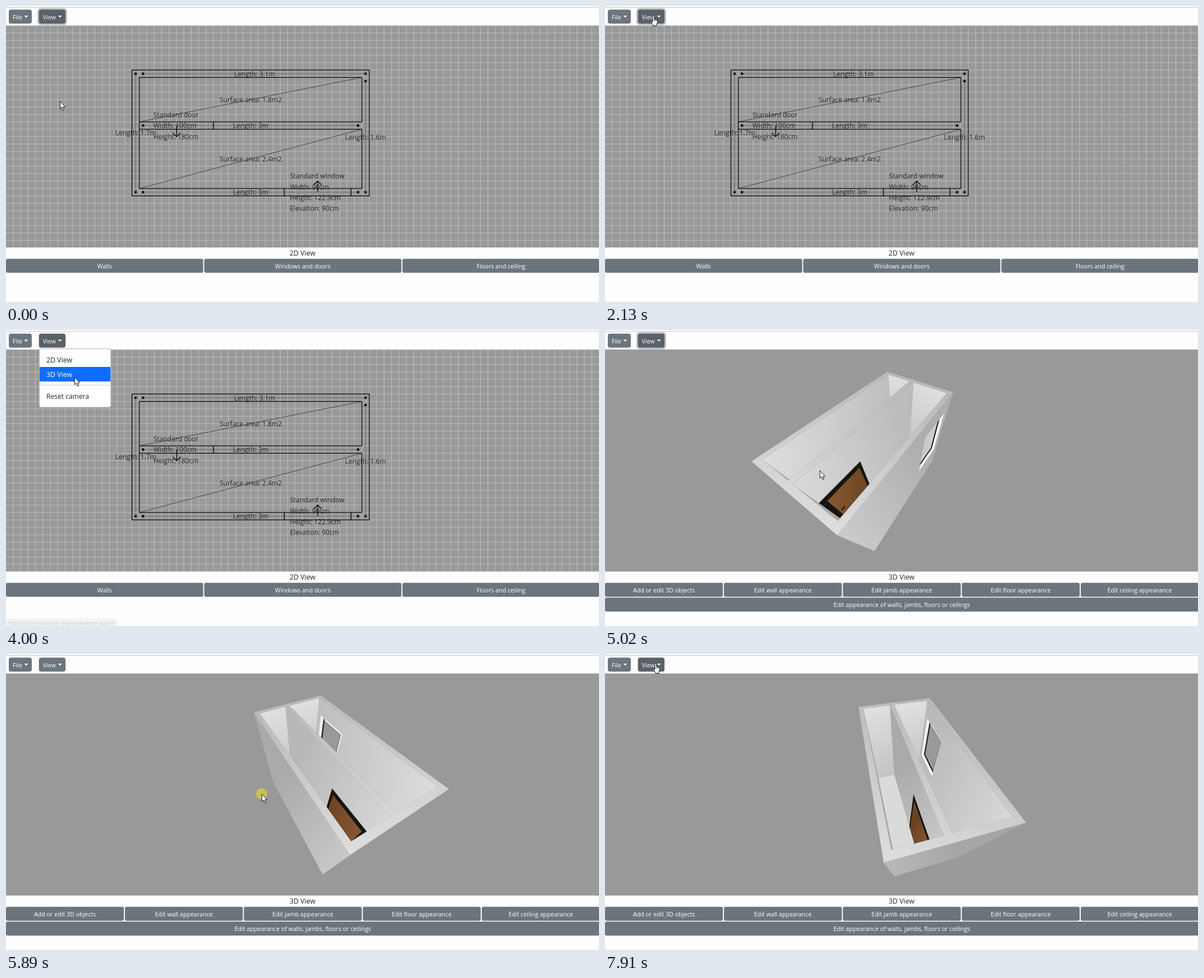
Write an HTML page with a canvas that moves like this. It is 1058 by 529 pixels and loops after 8000 ms.

```html
<!DOCTYPE html>
<html lang="en">
<head>
<meta charset="utf-8">
<title>Floor plan editor</title>
<style>
  html, body { margin: 0; width: 100%; height: 100%; overflow: hidden; background: #fefefe; }
  canvas { display: block; }
</style>
</head>
<body>
<canvas id="stage" width="1058" height="529"></canvas>
<script>
const ctx = document.getElementById("stage").getContext("2d");
const LOOP = 8000, TICK = 125.8;
const CX = 529, CY = 233.5, TOP = 34.8, BOTTOM = 431.7;
const GREY = "#6c757d", DARK = "#5a6168";

// Where the pointer glides to: x, y
const PATH = [
  { from: 0, lasts: 1, at: [96, 170] },
  { from: 490, lasts: 490, at: [86, 17] },
  { from: 2640, lasts: 360, at: [110, 83] },
  { from: 3520, lasts: 360, at: [122, 84] },
  { from: 4520, lasts: 490, at: [383, 251] },
  { from: 5290, lasts: 600, at: [456, 250] },
  { from: 6030, lasts: 610, at: [438, 250] },
  { from: 6910, lasts: 360, at: [134, 5] },
  { from: 7290, lasts: 600, at: [90, 16] }
];

// Where the camera swings to: yaw, pitch in degrees
const SWING = [
  { from: 0, lasts: 1, at: [32.9, 54.9] },
  { from: 5290, lasts: 600, at: [-28.6, 54.3] },
  { from: 6030, lasts: 740, at: [-14.2, 54.9] }
];

// The screen refreshes in even ticks
const snap = t => Math.max(0, 610 + TICK * Math.floor((t - 595) / TICK));
const within = (t, a, b) => t >= a && t < b;
const grey = v => { v = Math.round(v); return `rgb(${v},${v},${v})`; };

function glide(keys, t) {
  const i = keys.findLastIndex(k => k.from <= t);
  const key = keys[i], before = keys[Math.max(0, i - 1)].at;
  const u = Math.min(1, (t - key.from) / key.lasts);
  const eased = u * u * (3 - 2 * u);
  return key.at.map((v, j) => before[j] + (v - before[j]) * eased);
}

function rect(x, y, w, h, color) {
  ctx.fillStyle = color;
  ctx.fillRect(x, y, w, h);
}

function box(x, y, w, h, r, color) {
  ctx.beginPath();
  ctx.roundRect(x, y, w, h, r);
  ctx.fillStyle = color;
  ctx.fill();
}

function text(s, x, y, size, color, align = "left") {
  ctx.font = `${size}px "Open Sans", "Noto Sans", sans-serif`;
  ctx.textAlign = align;
  ctx.fillStyle = color;
  ctx.fillText(s, x, y);
}

function trace(points, close = true) {
  ctx.beginPath();
  points.forEach(([x, y]) => ctx.lineTo(x, y));
  if (close) ctx.closePath();
}

function fillPoly(points, color) {
  trace(points);
  ctx.fillStyle = color;
  ctx.fill();
}

function line(points, color, width = 1) {
  trace(points, false);
  ctx.strokeStyle = color;
  ctx.lineWidth = width;
  ctx.stroke();
}

/* ---------- page ---------- */

function dropButton(label, x, w, color) {
  box(x, 6.5, w, 25, 4, color);
  text(label, x + 7, 23.5, 10.7, "#fff");
  const c = x + w - 10;
  fillPoly([[c - 3.5, 17.3], [c + 3.5, 17.3], [c, 20.8]], "#fff");
}

function row(labels, y) {
  const pitch = 1061 / labels.length, w = pitch - 1.9;
  labels.forEach((s, i) => {
    box(i * pitch, y, w, 25, 3, GREY);
    text(s, i * pitch + w / 2, y + 17, 10.7, "#fff", "center");
  });
}

function page(t, is3d) {
  rect(0, 0, 1058, TOP, "#fefefe");
  rect(0, BOTTOM, 1058, 529 - BOTTOM, "#fefefe");
  rect(0, 2, 1058, 1, "#c4c4c4");
  if (t < 3890 || within(t, 4130, 5410)) box(56, 3.5, 53, 31, 6, "#c0c4c8");
  dropButton("File", 5, 41, GREY);
  dropButton("View", 58.7, 47.5, t < 5410 || t >= 7660 ? DARK : GREY);

  text(is3d ? "3D View" : "2D View", CX, 446, 12.4, "#212529", "center");
  if (is3d) {
    row(["Add or edit 3D objects", "Edit wall appearance", "Edit jamb appearance",
      "Edit floor appearance", "Edit ceiling appearance"], 451.7);
    row(["Edit appearance of walls, jambs, floors or ceilings"], 478.2);
  } else {
    row(["Walls", "Windows and doors", "Floors and ceiling"], 451.7);
  }
}

function menu(t) {
  if (!within(t, 2250, 4130)) return;
  box(59, 33, 128.5, 105.5, 4, "#b9b9b9");
  box(60, 34, 126.5, 103.5, 3, "#fff");
  const pressed = t >= 3890;
  if (within(t, 2770, 2890)) rect(60, 40, 126.5, 26, "#e9ecef");
  if (t >= 2890) rect(60, 66, 126.5, 26, pressed ? "#0d6efd" : "#e9ecef");
  rect(60, 98, 126.5, 1, "#cfcfcf");
  text("2D View", 72, 58, 12.4, "#212529");
  text("3D View", 72, 83.8, 12.4, pressed ? "#fff" : "#212529");
  text("Reset camera", 72, 123.2, 12.1, "#212529");
}

function status(t) {
  const full = within(t, 2770, 4130);
  if (full) box(-4, 515.5, 203, 18, 3, "#f3f3f3");
  if (full || within(t, 2370, 2520)) {
    text("https://home-planner-deployed.vercel.app/#", 3, 527, 9.14, full ? "#c6c6c6" : "#e2e2e2");
  }
}

/* ---------- plan ---------- */

const CELL = 397 / 30;
const gx = i => CX + i * CELL;
const gy = i => CY + i * CELL;

function arrow(x, y, dir) {
  const tip = y + dir * 20;
  line([[x, y], [x, tip]], "#000", 1.3);
  line([[x - 7, tip - dir * 7], [x, tip], [x + 7, tip - dir * 7]], "#000", 1.3);
}

function axis(x1, y1, x2, y2) {
  const ends = [[gx(x1), gy(y1)], [gx(x2), gy(y2)]];
  line(ends, "#666");
  for (const [x, y] of ends) {
    ctx.beginPath();
    ctx.arc(x, y, 2.3, 0, 7);
    ctx.fillStyle = "#000";
    ctx.fill();
  }
}

function plan() {
  for (let i = -40; i <= 40; i++) line([[gx(i), TOP], [gx(i), BOTTOM]], "#bdbdbd");
  for (let i = -15; i <= 15; i++) line([[0, gy(i)], [1058, gy(i)]], "#bdbdbd");

  axis(-21.5, -8.5, 8.5, -8.5);
  axis(-22.5, -8.5, -22.5, 7.5);
  axis(8.5, -7.5, 8.5, 7.5);
  axis(-21.5, -1.5, 7.5, -1.5);
  axis(-21.5, 7.5, 7.5, 7.5);
  line([[gx(-22), gy(-2)], [gx(8), gy(-8)]], "#444");
  line([[gx(-22), gy(7)], [gx(8), gy(-1)]], "#444");

  ctx.strokeStyle = "#0a0a0a";
  ctx.lineWidth = 1.3;
  ctx.strokeRect(gx(-23), gy(-9), 32 * CELL, 17 * CELL);
  ctx.strokeRect(gx(-22), gy(-8), 30 * CELL, 6 * CELL);
  ctx.strokeRect(gx(-22), gy(-1), 30 * CELL, 8 * CELL);

  for (const x of [gx(-22), gx(-12)]) line([[x, gy(-2)], [x, gy(-1)]], "#000", 1.3);
  for (const x of [496.5, 615.5]) line([[x, gy(7)], [x, gy(8)]], "#000", 1.3);
  arrow(304.5, 213.5, 1);
  arrow(556, 332.7, -1);

  const label = (s, x, y) => text(s, x, y, 12, "#2a2a2a");
  label("Length: 3.1m", 407, 125.7);
  label("Length: 3m", 405, 218);
  label("Length: 3m", 405, 337.3);
  label("Length: 1.7m", 195, 231.2);
  label("Length: 1.6m", 605, 238.5);
  label("Surface area: 1.8m2", 381, 171.7);
  label("Surface area: 2.4m2", 381, 277.7);
  ["Standard door", "Width: 100cm", "Height: 180cm"]
    .forEach((s, i) => label(s, 263, 199 + i * 19.3));
  ["Standard window", "Width: 90cm", "Height: 122.9cm", "Elevation: 90cm"]
    .forEach((s, i) => label(s, 506.5, 308.2 + i * 19.4));
}

/* ---------- model, in metres: l along, s across, h up ---------- */

const LONG = 3.2, WIDE = 1.7, HIGH = 2.5, THICK = 0.1;
const FOCAL = 198.5 / Math.tan(37.5 * Math.PI / 180);
const ROOMS = [[0.1, 0.7], [0.8, 1.6]];
const DOOR = [0.1, 1.1, 0, 1.8];
const WINDOW = [2.055, 2.955, 0.9, 2.129];

function makeCamera([yawDeg, pitchDeg]) {
  const yaw = yawDeg * Math.PI / 180, pitch = pitchDeg * Math.PI / 180;
  const sy = Math.sin(yaw), cy = Math.cos(yaw), sp = Math.sin(pitch), cp = Math.cos(pitch);
  // The pivot drifts a little with the yaw
  const l0 = 2.603 + 0.0005 * yawDeg, s0 = 0.827 - 0.0011 * yawDeg, reach = 5.08;
  const eye = [l0 - reach * cp * cy, s0 + reach * cp * sy, reach * sp];
  const project = ([l, s, h]) => {
    const dl = l - eye[0], ds = s - eye[1], drop = eye[2] - h;
    const right = dl * sy + ds * cy, ahead = dl * cy - ds * sy;
    const depth = ahead * cp + drop * sp;
    return [CX + FOCAL * right / depth, CY - FOCAL * (ahead * sp - drop * cp) / depth];
  };
  return { eye, project };
}

const distance = (a, b) => Math.hypot(a[0] - b[0], a[1] - b[1], a[2] - b[2]);
const outline = (l1, l2, s1, s2, h) => [[l1, s1, h], [l2, s1, h], [l2, s2, h], [l1, s2, h]];
const panel = (s, l1, l2, h1, h2) => [[l1, s, h2], [l2, s, h2], [l2, s, h1], [l1, s, h1]];

function gradient(cam, points, near, far) {
  const sorted = [...points].sort((a, b) => distance(a, cam.eye) - distance(b, cam.eye));
  const g = ctx.createLinearGradient(...cam.project(sorted[0]), ...cam.project(sorted.at(-1)));
  g.addColorStop(0, grey(near));
  g.addColorStop(1, grey(far));
  return g;
}

// Draws an upright face on axis 0 (l) or 1 (s) if its front looks at the eye
function wall(cam, axis, at, side, from, to) {
  const gap = (cam.eye[axis] - at) * side;
  if (gap <= 0) return false;
  const point = (p, h) => axis ? [p, at, h] : [at, p, h];
  const pts = [point(from, HIGH), point(to, HIGH), point(to, 0), point(from, 0)];
  const facing = gap / distance(point((from + to) / 2, HIGH / 2), cam.eye);
  const v = 165 + 52 * (1 - Math.exp(-3.5 * facing));
  const spread = Math.min(1, facing * 8);
  fillPoly(pts.map(cam.project), gradient(cam, pts, v + 12 * spread, v - 18 * spread));
  return true;
}

function door(cam, s) {
  const [l1, l2, h1, h2] = DOOR;
  const quad = (...sides) => panel(s, ...sides).map(cam.project);
  fillPoly(quad(l1, l2, h1, h2), "#17150f");
  const leaf = quad(l1 + 0.1, l2 - 0.07, h1, h2 - 0.14);
  const wood = ctx.createLinearGradient(...leaf[0], ...leaf[2]);
  wood.addColorStop(0, "#875832");
  wood.addColorStop(0.5, "#7b4e2a");
  wood.addColorStop(1, "#6c4323");
  fillPoly(leaf, wood);
  for (let i = 1; i < 7; i++) {
    const l = l1 + 0.1 + i * 0.115 + 0.02 * Math.sin(i * 5);
    line([[l, s, h2 - 0.14], [l + 0.02, s, 0]].map(cam.project), "rgba(60,32,12,.15)");
  }
  if (s > 0.75) {
    line([[l1 + 0.14, s, 1], [l1 + 0.24, s, 1]].map(cam.project), "#17150f", 2);
  }
}

// The frame sits back in the wall, so the white jamb shows beside it
function windowFrame(cam, s, inward, glass) {
  const [l1, l2, h1, h2] = WINDOW;
  const inset = (d, depth) =>
    panel(s + inward * depth, l1 + d, l2 - d, h1 + d, h2 - d).map(cam.project);
  const opening = inset(0, 0);
  ctx.save();
  fillPoly(opening, "#f4f4f2");
  trace(opening);
  ctx.clip();
  const rim = inset(0.05, 0.06);
  line([...rim, rim[0]], "#666", 0.8);
  const pane = inset(0.11, 0.06);
  fillPoly(pane, glass);
  line([...pane, pane[0]], "#555", 0.8);
  line(inset(0.08, 0.06).slice(1), "#111", 1.6);
  ctx.restore();
}

function room(cam, [s1, s2], i) {
  const l1 = THICK, l2 = LONG - THICK;
  ctx.save();
  trace(outline(l1, l2, s1, s2, HIGH).map(cam.project));
  ctx.clip();
  fillPoly(outline(l1, l2, s1, s2, 0).map(cam.project), "#dadada");
  wall(cam, 0, l2, -1, s1, s2);
  wall(cam, 0, l1, 1, s1, s2);
  const low = wall(cam, 1, s1, 1, l1, l2);
  const high = wall(cam, 1, s2, -1, l1, l2);
  if (i === 0 && high) door(cam, s2);
  if (i === 1 && low) door(cam, s1);
  if (i === 1 && high) windowFrame(cam, s2, 1, "#999");
  ctx.restore();
}

function house(cam) {
  const rim = outline(0, LONG, 0, WIDE, HIGH);

  // Wall tops with the rooms cut out
  ctx.beginPath();
  const openings = ROOMS.map(([a, b]) => outline(THICK, LONG - THICK, a, b, HIGH));
  for (const ring of [rim, ...openings]) {
    ring.map(cam.project).forEach(([x, y], i) => i ? ctx.lineTo(x, y) : ctx.moveTo(x, y));
    ctx.closePath();
  }
  ctx.fillStyle = gradient(cam, rim, 222, 184);
  ctx.fill("evenodd");

  ROOMS.forEach((r, i) => room(cam, r, i));
  wall(cam, 0, 0, -1, 0, WIDE);
  wall(cam, 0, LONG, 1, 0, WIDE);
  wall(cam, 1, 0, -1, 0, LONG);
  if (wall(cam, 1, WIDE, 1, 0, LONG)) windowFrame(cam, WIDE, -1, "#cbcbcb");
}

/* ---------- pointer ---------- */

const ARROW = [[0, 0], [0, 13.2], [3, 10.6], [5.2, 15.8], [7.4, 14.8], [5.2, 9.9], [9.2, 9.6]];
const HAND = [[-1.5, 1], [0, 0], [1.5, 1], [1.5, 6], [4, 6], [6.6, 7.6], [7, 12], [5.6, 15],
  [5.6, 18], [-0.5, 18], [-1, 16], [-4.2, 11], [-3.4, 9.4], [-1.5, 11]];

function pointer(t) {
  const [x, y] = glide(PATH, snap(t));
  if (within(t, 5410, 6790)) {
    ctx.beginPath();
    ctx.arc(x, y, 10, 0, 7);
    ctx.fillStyle = "#c7c257";
    ctx.fill();
  }
  const hand = within(t, 860, 3890) || t >= 7660;
  const shape = (hand ? HAND : ARROW).map(([a, b]) => [x + a + 0.5, y + b + 0.5]);
  fillPoly(shape, "#fff");
  ctx.lineJoin = "round";
  line([...shape, shape[0]], "#111", 1);
  if (hand) {
    for (const a of [1.5, 4]) line([[x + a + 0.5, y + 7], [x + a + 0.5, y + 10]], "#111", 0.9);
  }
  ctx.lineJoin = "miter";
}

function draw(t) {
  const is3d = t >= 4130;
  rect(0, 0, 1058, 529, "#999");
  if (is3d) house(makeCamera(glide(SWING, snap(t))));
  else plan();
  page(t, is3d);
  menu(t);
  status(t);
  pointer(t);
}

const start = performance.now();
function frame() {
  draw((performance.now() - start) % LOOP);
  requestAnimationFrame(frame);
}
frame();
</script>
</body>
</html>
```
